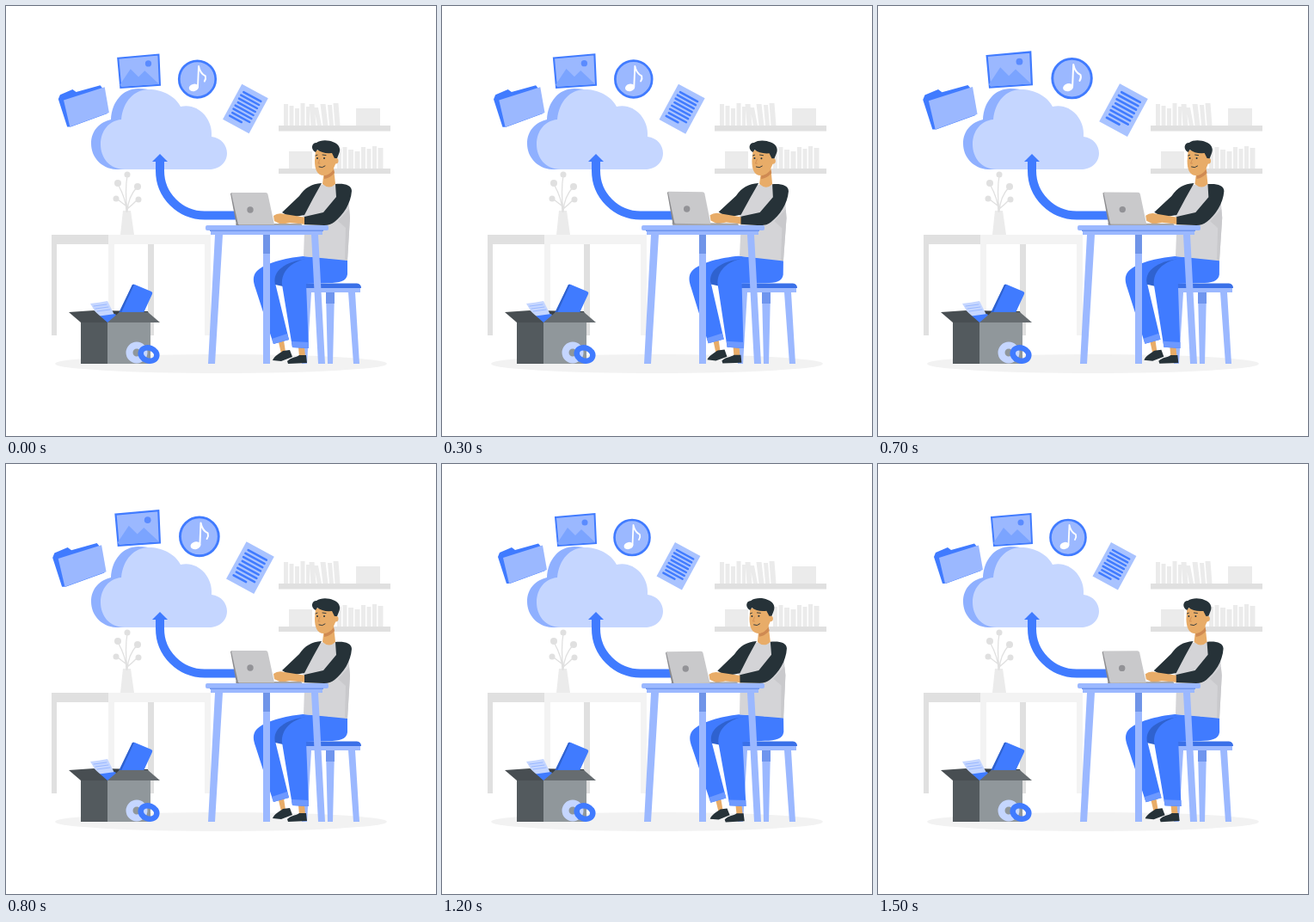
These frames come from a looping animation (500x500 px, 1.6 s). An HTML page:

```html
<!DOCTYPE html>
<html lang="en">
<head>
<meta charset="utf-8">
<title>Cloud upload</title>
<style>
  html, body { margin: 0; width: 100%; height: 100%; overflow: hidden; background: #fff; }
  svg { display: block; width: 100vw; height: 100vh; }
  .blue { fill: #407bff; }
  .soft { fill: #9bb8ff; }
  .pale { fill: #c5d6ff; }
  .deep { fill: #2f62cf; }
  .ink { fill: #263238; }
  .skin { fill: #e8ac68; }
  .grey { fill: #e0e0e0; }
  .mist { fill: #ebebeb; }
  .line { fill: none; stroke-linecap: round; stroke-linejoin: round; }
</style>
</head>
<body>
<svg viewBox="0 0 500 500">
  <ellipse cx="250" cy="416" rx="193" ry="11" fill="#f2f2f2"/>

  <g id="shelves">
    <path class="grey" d="M317 139h130v6.5H317zM317 189h130v6H317z"/>
    <path class="mist" d="M407 119h28v20h-28zM329 169h27v20h-27z"/>
  </g>

  <g id="sideboard">
    <path class="grey" d="M53 266h66v11H59v106h-6zM165 277h7v106h-7z"/>
    <path d="M119 266h119v117h-7V277H126v106h-7z" fill="#f3f3f3"/>
    <path class="mist" d="M136 238h9l4 28h-16z"/>
    <path class="line" d="M140 239Q140 225 130 207M141 239Q138 215 141 197M141 239Q142 222 152 211M141 236Q147 231 153 225M139 232L130 225" stroke="#e0e0e0" stroke-width="1.3"/>
    <g class="grey">
      <circle cx="141" cy="196" r="3.5"/><circle cx="130" cy="206" r="4"/>
      <circle cx="153" cy="210" r="4"/><circle cx="154" cy="225" r="3.5"/>
      <circle cx="128" cy="224" r="3.5"/>
    </g>
  </g>

  <path d="M128 190C110 189 99 175 99 160C99 145 109 135 122 132C123 111 136 96 154 96Q164 96 172 99L140 190Z" fill="#8fb0ff"/>
  <path class="pale" d="M138 190C120 190 110 176 110 161C110 145 120 133 134 132C136 111 149 97 166 97C182 97 197 105 203 117C222 112 241 130 239 152C250 153 257 162 257 171C257 183 247 190 236 190Z"/>
  <path class="line" d="M272 243.500H231A52 52 0 0 1 179 191.500V180" stroke="#407bff" stroke-width="10" style="stroke-linecap:butt"/>
  <path class="blue" d="M170 181L179 172L188 181Z"/>

  <g id="icons">
    <path class="blue" d="M65 108L67 103L81 97L85 100L112 92.500L115 96L120 124L79 139H75Z"/>
    <path class="soft" d="M71 109L117 94.500L122 123L78 139Z"/>

    <path class="soft" d="M132 62L177.500 58L179 92L135 95Z" stroke="#407bff" stroke-width="2"/>
    <path d="M134 92L146 74L155 83L162 76L178 91L136 94Z" fill="#7ba4ff"/>
    <circle cx="166" cy="68" r="3.500" fill="#5a8bff"/>

    <circle cx="221" cy="85.500" r="20.500" fill="#9bb8ff" stroke="#407bff" stroke-width="2.600"/>
    <ellipse cx="217" cy="95" rx="5.500" ry="4" fill="#fff" transform="rotate(-15 217 95)"/>
    <path class="line" d="M221.500 94L222.500 71Q224 79 230 82Q231 85 229 88" stroke="#fff" stroke-width="1.800"/>

    <g transform="translate(271 91) rotate(28.500)">
      <path d="M0 0H33.500V45H0Z" fill="#a9c3ff"/>
      <path id="text" class="line" stroke="#407bff" stroke-width="2.400"/>
    </g>
  </g>

  <g id="stool">
    <path class="soft" d="M346 328h66v5h-66zM348 333h7l-5 83h-6zM372 333h10l-2 83h-6zM398 333h8l5 83h-7z"/>
    <path d="M372 333h10v13h-10z" fill="#6f95ee"/>
    <path d="M349 322.500H408Q413 323 413 328H345V325Z" fill="#3a70e8"/>
  </g>

  <g id="person">
    <path class="skin" d="M317 391L323 389L325 402L320 404ZM340 397L347 397L348 407L341 408Z"/>
    <path class="ink" d="M310 412C312 407 318 404 322 401L330 400L333 408L320 413ZM327 413C332 408 337 409 341 406L349 406L350 415L328 416Z"/>
    <path class="blue" d="M375 293L345 291C325 293 300 299 291 309C286 315 288 322 290 328L311 393L329 388L313 322L350 320Z"/>
    <path class="deep" d="M313 324C309 308 325 297 350 294L360 320L322 326Z"/>
    <path class="blue" d="M397 293V312C396 320 388 322 375 322L349 323L352 398L333 397L321 324C320 308 332 298 348 294Z"/>
    <path d="M309 387L327 381L329 388L311 393ZM332 390L352 391V398L333 397Z" fill="#6d99ff"/>

    <path d="M362 208L384 207L398 222L400 246L397 296L346 291L347 262L345 240L352 220Z" fill="#d4d4d7"/>
    <path d="M399 236L400 246L397 296L394 295L395 258L386 250Z" fill="#c9c9cc"/>
    <path class="ink" d="M367 206C355 207 348 211 341 221L321 240L331 246L347 243L357 224Z"/>
    <path class="skin" d="M311 244Q316 240 324 242L349 246V254L330 252L320 254L312 250Z"/>
    <path class="ink" d="M383 207C393 206 402 208 402 215C401 230 392 243 382 251Q377 255 370 255L347 254L347 245L369 240L384 222Z"/>

    <path class="skin" d="M370 190L381 188L383 207Q376 214 368 207Z"/>
    <path d="M370 197Q377 196 381 190L382 194Q377 200 370 201Z" fill="#cf8a52"/>
    <path class="skin" d="M360 168L381 166L384 181C381 191 376 197 369 197C362 197 359 190 359 180Z"/>
    <circle class="skin" cx="383" cy="180" r="3.500"/>
    <path class="ink" d="M360 170C354 167 355 159 361 159C366 155 376 156 380 158C387 160 390 166 387 172L385 177L382 177L379 171Q368 172 362 167Z"/>
    <circle class="ink" cx="362" cy="177" r="1"/><circle class="ink" cx="370" cy="177" r="1"/>
    <path class="line" d="M360 174l2-.8M368 173l4 .5M364 187q4 2 7-1" stroke="#263238" stroke-width=".9"/>
    <path class="line" d="M365 178l-2 5h2" stroke="#cf8a52" stroke-width=".8"/>

    <path d="M267 253H343Q346 255 343 257H268Z" fill="#a6a6a9"/>
    <path d="M261 218L263 217L271 255H268Z" fill="#8b8b8e"/>
    <path d="M263 217H302Q304 217 304.500 219L312 254H270L262 218Z" fill="#c9c9cb"/>
    <circle cx="284" cy="237" r="3.700" fill="#929296"/>
  </g>

  <g id="desk">
    <path class="soft" d="M238 261h130v5H238zM243 266h9l-9 150h-8zM299 266h8v150h-8zM355 266h8l8 150h-8z"/>
    <path d="M299 266h8v22h-8z" fill="#6f94e8"/>
    <rect class="soft" x="232" y="255" width="143" height="6" rx="2"/>
    <path d="M237 260.500h132v1.500H237z" fill="#6f95ee"/>
  </g>

  <g id="box">
    <path d="M87 368L103 354L165 355L168 368Z" fill="#3a4044"/>
    <path class="pale" d="M98 346Q108 345 118 343L127 361H107Z"/>
    <path class="line" d="M102 349l15-2M104 352l15-2M106 355l15-2" stroke="#8fb0ff" stroke-width=".8"/>
    <path class="blue" d="M147 324Q148 323 150 324L169 332Q171 333 170 335L158 361L131 358Z"/>
    <path class="deep" d="M147 324L149 324L133 359H130Z"/>
    <path class="blue" d="M105 361L127 358L133 369H113Z"/>
    <path d="M87 368h31v48H87z" fill="#535a5e"/>
    <path d="M118 368h50v48h-50z" fill="#90979b"/>
    <path d="M73 356L102 354L118 368H87Z" fill="#484e52"/>
    <path d="M118 368L132 356H165L179 368Z" fill="#666c70"/>
    <circle class="line" cx="152" cy="403" r="8.500" stroke="#c5d6ff" stroke-width="8"/>
    <ellipse class="line" cx="166" cy="405" rx="9.500" ry="7.500" stroke="#407bff" stroke-width="6.500" transform="rotate(20 166 405)"/>
  </g>
</svg>
<script>
  const $ = id => document.getElementById(id);
  const LOOP = 1600, STEP = 100;

  const books = (x, base, sizes) => sizes.map(([width, height, lean = 0]) => {
    const d = `M${x} ${base}h${width}l${-lean} ${-height}h${-width}z`;
    x += width + 1.5;
    return d;
  }).join('');
  const addBooks = d => $('shelves').insertAdjacentHTML('beforeend', `<path class="mist" d="${d}"/>`);
  addBooks(books(323, 139, [[5, 25], [5, 23], [5, 20], [5, 26], [4, 22], [6, 25, 2], [5, 21, 4], [6, 25, 3], [5, 24, 2], [6, 26, 2]]));
  addBooks(books(385, 189, [[5, 23], [5, 25], [6, 22], [6, 20], [5, 25], [5, 23], [5, 26], [6, 24]]));

  $('text').setAttribute('d', Array.from({ length: 8 }, (_, i) =>
    `M${i % 3 ? 5 : 6} ${7 + i * 4.4}H${i === 7 ? 20 : 28}`).join(''));

  const pulse = (t, peak) => {
    const u = (t - peak) / 250;
    return Math.abs(u) < 1 ? Math.cos(u * Math.PI / 2) ** 2 : 0;
  };

  function draw(now) {
    const t = Math.floor(now % LOOP / STEP) * STEP;
    const scale = 1 + 0.115 * (pulse(t, 155) + pulse(t, 730));
    const tilt = 0.8 * Math.sin(2 * Math.PI * t / LOOP);
    $('icons').setAttribute('transform', `translate(180 98) scale(${scale}) translate(-180 -98)`);
    $('person').setAttribute('transform', `rotate(${tilt} 360 290)`);
  }

  const start = performance.now();
  (function tick() {
    draw(performance.now() - start);
    requestAnimationFrame(tick);
  })();
</script>
</body>
</html>
```
